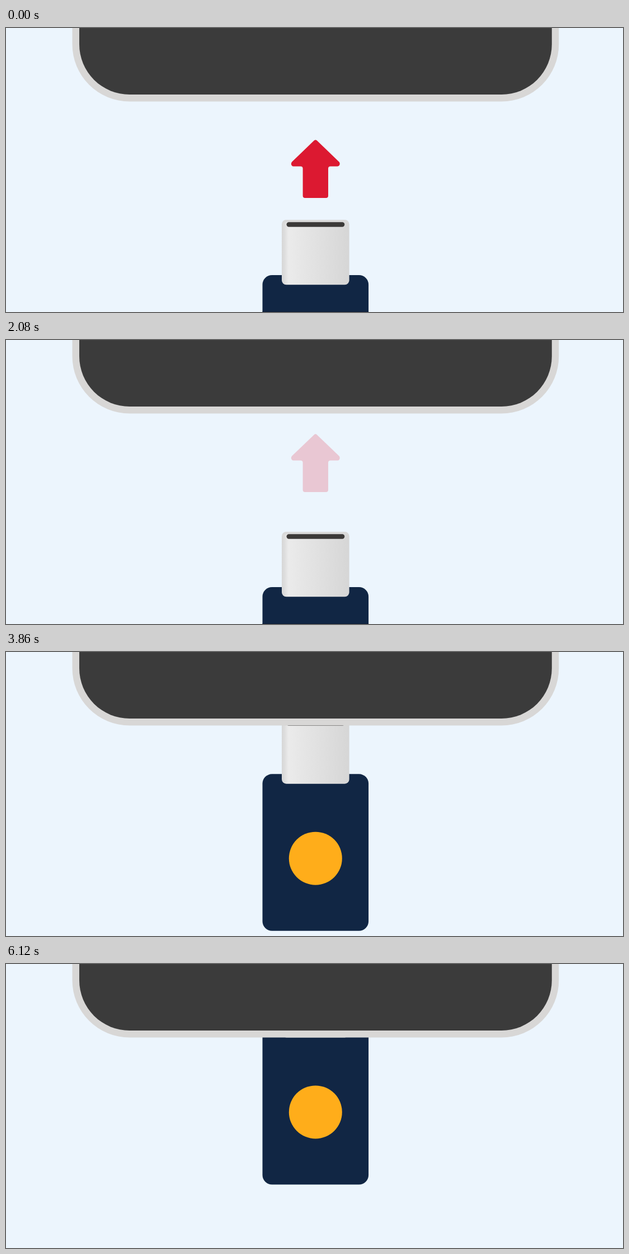
Animation, 1103 px wide and 508 px high, one loop 8000 ms. Source, as an HTML page:

```html
<!DOCTYPE html>
<html lang="en">
<head>
<meta charset="utf-8">
<title>Plug in</title>
<style>
  html, body { margin: 0; width: 100%; height: 100%; overflow: hidden; background: #ecf5fd; }
  svg { display: block; width: 100%; height: 100%; }
</style>
</head>
<body>
<svg viewBox="0 0 1103 508">
  <defs>
    <linearGradient id="metal">
      <stop offset="0" stop-color="#d7d7d7"/>
      <stop offset=".04" stop-color="#dddddd"/>
      <stop offset=".1" stop-color="#ebebeb"/>
      <stop offset=".3" stop-color="#e6e6e6"/>
      <stop offset="1" stop-color="#d6d6d6"/>
    </linearGradient>
  </defs>
  <rect width="1103" height="508" fill="#ecf5fd"/>
  <path id="arrow" fill="#dc1931" d="M550.5 201.6Q553.3 199 556.1 201.6L595.5 239.5C598 242.5 596.5 247.3 592.5 247.5H580Q576 247.5 576 251.5V300Q576 304 572 304H534.7Q530.6 304 530.6 300V251.5Q530.6 247.5 526.6 247.5H514C510 247.3 508.5 242.5 511.1 239.5Z"/>
  <g id="stick">
    <rect x="458.5" y="442" width="189.6" height="280.5" rx="17" fill="#112644"/>
    <circle cx="553.3" cy="592.8" r="47.5" fill="#ffad1a"/>
    <rect x="493" y="343.3" width="120.6" height="116" rx="8" fill="url(#metal)"/>
    <path d="M493.4 349Q495 343.3 501 343.3H605.6Q611.6 343.3 613.2 349L605.5 347.2H501.5Z" fill="#d9d9d9"/>
    <rect x="501.5" y="347.2" width="103.8" height="8.5" rx="4.2" fill="#3b3938"/>
  </g>
  <rect id="edge" x="458.5" y="507" width="189.6" height="1" fill="#0c1a33"/>
  <rect x="118.5" y="-300" width="869.8" height="431.5" rx="102.5" fill="#d8d7d6"/>
  <rect x="131" y="-300" width="844.8" height="419" rx="90" fill="#3b3b3b"/>
</svg>
<script>
const LOOP = 8000;
const [arrow, stick, edge] = ['arrow', 'stick', 'edge'].map(id => document.getElementById(id));

// Playback rhythm: two short steps, then a long one, every 140 ms.
function stepAt(ms) {
  const beat = Math.floor((ms - 80) / 140);
  const rest = ms - 80 - beat * 140;
  return beat * 3 + (rest < 20 ? 0 : rest < 40 ? 1 : 2);
}

const progress = (n, from, to) => Math.min(1, Math.max(0, (n - from) / (to - from)));
const smooth = p => p * p * (3 - 2 * p);

// Cubic Bezier easing with control points (a, 0) and (b, 1).
function ease(p, a, b) {
  let lo = 0, hi = 1;
  for (let i = 0; i < 24; i++) {
    const t = (lo + hi) / 2, u = 1 - t;
    if (3 * a * u * u * t + 3 * b * u * t * t + t * t * t < p) lo = t;
    else hi = t;
  }
  return p >= 1 ? 1 : p <= 0 ? 0 : smooth(lo);
}

const lift = (el, y) => el.setAttribute('transform', `translate(0 ${-y.toFixed(2)})`);

function render(ms) {
  const n = stepAt(ms);
  lift(arrow, 33.2 * ease(progress(n, 8, 49), 0.53, 0.62));
  arrow.setAttribute('opacity', 1 - smooth(progress(n, 32, 49)));
  const rise = 327.9 * ease(progress(n, 50.05, 102.05), 0.498, 0.502);
  lift(stick, rise);
  edge.setAttribute('visibility', rise < 214 ? 'visible' : 'hidden');
}

const start = performance.now();
function tick() {
  render((performance.now() - start) % LOOP);
  requestAnimationFrame(tick);
}
tick();
</script>
</body>
</html>
```
